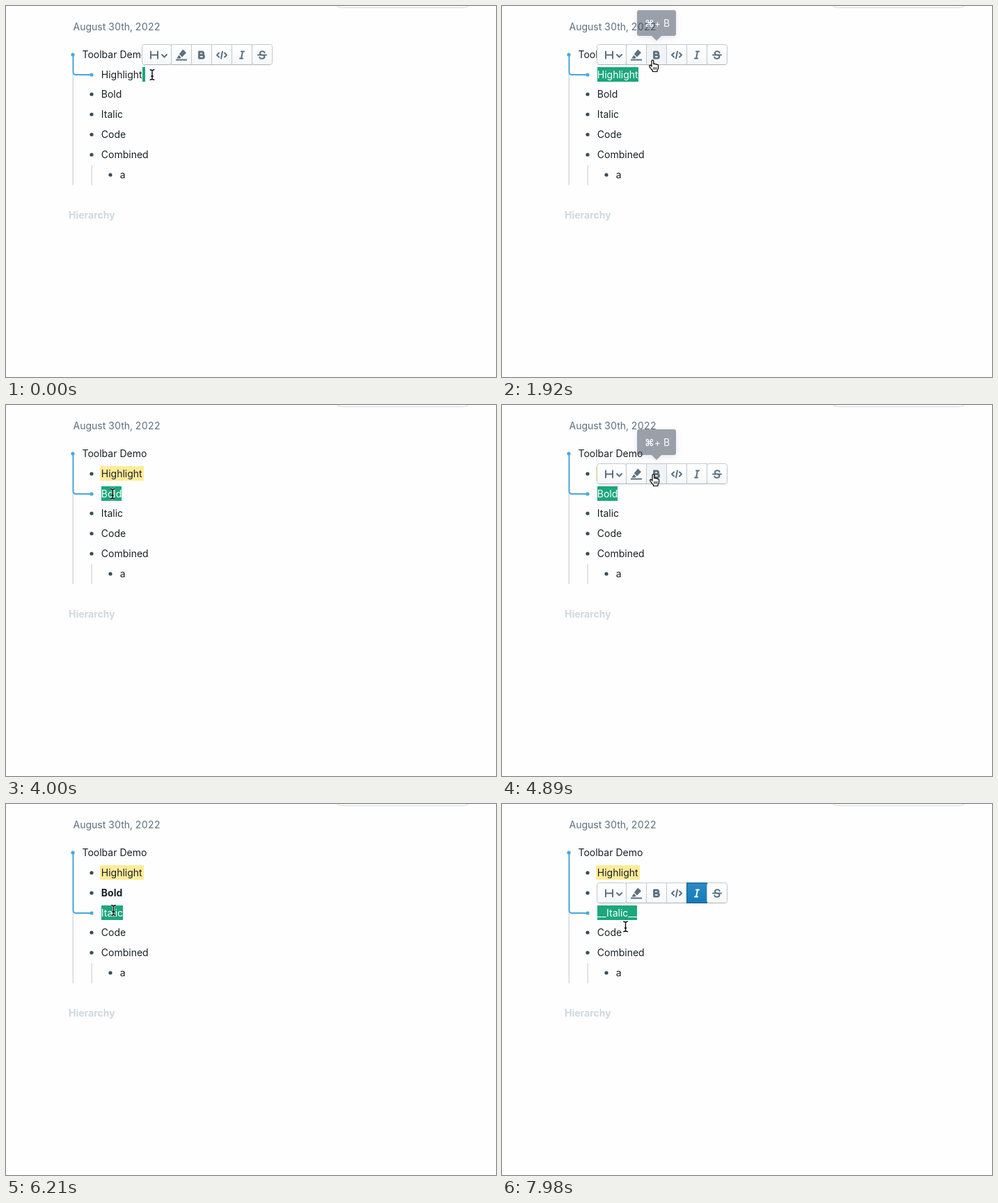
An HTML page that plays this animation: 704x534 px, repeating every 8 s.

```html
<!DOCTYPE html>
<html lang="en">
<head>
<meta charset="utf-8">
<title>Toolbar Demo</title>
<style>
html, body { margin: 0; width: 100%; height: 100%; overflow: hidden; background: #fefefe; }
body { position: relative; font: 14px/21px Inter, sans-serif; color: #182026; }
svg { position: absolute; left: 0; top: 0; }
p { position: absolute; margin: 0; white-space: pre; }
i, mark { display: inline-block; font-style: normal; color: inherit; }
i { background: #1ba77c; color: #fff; }
mark { background: #ffec99; padding: 0 2px; margin: 0 -2px; }
.date { color: #5c7080; font-variant-numeric: tabular-nums; }
.head { color: #ced9e0; font-weight: 700; }
</style>
</head>
<body>
<svg id="back" width="704" height="534"></svg>
<div id="text"></div>
<svg width="704" height="534">
  <defs>
    <linearGradient id="plain" x2="0" y2="1"><stop stop-color="#fff"/><stop offset="1" stop-color="#f5f8fa"/></linearGradient>
    <linearGradient id="on" x2="0" y2="1"><stop stop-color="#2b89c4"/><stop offset="1" stop-color="#137cbd"/></linearGradient>
    <linearGradient id="press" x2="0" y2="1"><stop stop-color="#2874a9"/><stop offset="1" stop-color="#10629a"/></linearGradient>
  </defs>
  <g id="front"></g>
</svg>
<script>
const LOOP = 8000, STEP = 147.9;
const $ = id => document.getElementById(id);

// edits in steps: word selected, then formatted with a toolbar button
const edits = [
  { word: 'Highlight', wrap: '^^', tag: 'mark', select: 4, format: 20, button: 1 },
  { word: 'Bold', wrap: '**', tag: 'b', select: 26, format: 36, button: 2 },
  { word: 'Italic', wrap: '__', select: 41, format: 51, button: 4 }
];
const words = ['Highlight', 'Bold', 'Italic', 'Code', 'Combined', 'a'];

// pointer moves: first step, last step, destination
const moves = [
  [0, 1, 210, 99], [1, 4, 184, 98], [7, 13, 216.5, 78], [14, 18, 189.5, 72], [21, 25, 153, 128],
  [28, 33, 217.5, 100], [36, 41, 154.5, 153], [43, 48, 272, 130], [51, 54, 177.5, 176.5]
];

const focusAt = k => Math.max(0, edits.findLastIndex(e => k >= e.select));

function pointerAt(k) {
  let [, , x, y] = moves[0];
  for (const [from, to, tx, ty] of moves) {
    const u = Math.min(1, Math.max(0, (k - from) / (to - from))), e = 1 - (1 - u) ** 2;
    x += (tx - x) * e;
    y += (ty - y) * e;
  }
  return { x, y };
}

function barAt(k) {
  if (k < 3) return { x: 195, y: 55 };
  const f = focusAt(k), next = edits[f + 1];
  const open = k >= edits[f].select + 2 && !(next && k >= next.select - 1);
  return open ? { x: 136, y: 55 + 29 * f } : null;
}

function hoverAt(k) {
  const bar = barAt(k), { x, y } = pointerAt(k);
  return bar && y > bar.y && y < bar.y + 30 ? Math.floor((x - bar.x - 42) / 29) + 1 : -1;
}

const line = (d, w = 2) => `<path d="${d}" fill="none" stroke="currentColor" stroke-width="${w}" stroke-linecap="round" stroke-linejoin="round"/>`;
const icons = [
  line('M3 3V13M13 3V13M3 8H13M19 7.5l3.5 3.5 3.5-3.5'),
  '<path fill="currentColor" d="M10.2 0L15 4.8 9 11 4.8 6.8zM4.3 8.2L7.7 11.6 6.3 13H1.3zM0 14H16V16H0z"/>',
  line('M4.5 3.5H8.4a2.2 2.2 0 0 1 0 4.5H4.5zM4.5 8H9.2a2.3 2.3 0 0 1 0 4.6H4.5z', 2.8),
  line('M4 5L1 8l3 3M12 5l3 3-3 3M9 3L7 13'),
  line('M7 3h4M5 13h4M9 3L7 13'),
  line('M2 8h12M11.6 4.6A3.4 2.6 0 1 0 8 8a3.6 2.6 0 1 1-3.7 3.2')
];

function drawPointer({ x, y }, hand) {
  if (hand) return `<g transform="translate(${x - 6} ${y - 1})" stroke="#000" stroke-linejoin="round">
    <path fill="#fff" stroke-width="1.2" d="M4.5 10V2.2a1.4 1.4 0 0 1 2.8 0V6.5q1.3-1 2.4.3 1.4-.7 2.3.6 1.9-.5 2 1.3v3.3q0 2-1.5 3.6V17.5H6V16Q3.6 13.5 1.7 10.8.6 8.6 1.9 8.2 3 8 4.5 10z"/>
    <path stroke-width=".9" d="M7.3 11v3.5M9.3 11v3.5M11.3 11v3.5"/></g>`;
  const d = 'M-3.3-7.2q3.3 0 3.3 2 0-2 3.3-2M0-5V5M-3.3 7.2q3.3 0 3.3-2 0 2 3.3 2M-1.7 2h3.4';
  return `<g transform="translate(${x} ${y})" fill="none"><path d="${d}" stroke="#fff" stroke-width="3" opacity=".8"/>
    <path d="${d}" stroke="#000" stroke-width="1.4"/></g>`;
}

function drawToolbar({ x, y }, active, hover) {
  const buttons = icons.map((icon, i) => {
    const bx = i ? 13 + 29 * i : 0, on = i === active, over = i === hover;
    const fill = on ? `url(#${over ? 'press' : 'on'})` : over ? '#f1f4f7' : 'none';
    return `<rect x="${bx + .5}" y=".5" width="${i ? 29 : 42}" height="29" rx="${i % 5 ? 0 : 3}" fill="${fill}" stroke="${on ? '#0f5d8e' : '#c3c9ce'}"/>
      <g transform="translate(${bx + (i ? 7 : 10)} 7.5)" color="${on ? '#fff' : '#5c7080'}">${icon}</g>`;
  });
  return `<g transform="translate(${x} ${y})">
    <rect x=".5" y=".5" width="187" height="29" rx="3" fill="url(#plain)"/>${buttons.join('')}
    <path d="M3 29.5H185" stroke="#10161a" opacity=".12"/></g>`;
}

function drawTip(x, y, key) {
  return `<g transform="translate(${x} ${y - 49})" opacity=".5" style="filter:drop-shadow(0 2px 4px rgba(16,22,26,.2))">
    <path fill="#394559" d="M-25 0H25q3 0 3 3V34q0 3-3 3H7L0 44-7 37H-25q-3 0-3-3V3q0-3 3-3z"/>
    <text x="-17" y="23.6" fill="#f5f8fa"><tspan font-weight="600">⌘</tspan>+ ${key}</text></g>`;
}

function rowText(word, i, k) {
  const e = edits[i], next = edits[i + 1];
  if (!i && k < 3) return word + '<i> </i>';
  if (!e || k < e.select) return word;
  if (next && k >= next.select) return `<${e.tag}>${word}</${e.tag}>`;
  return `<i>${k < e.format ? word : e.wrap + word + e.wrap}</i>`;
}

function draw(k) {
  const focus = focusAt(k), edit = edits[focus];
  const rows = words.map((word, i) => ({
    x: i === 5 ? 163.8 : 136.8,
    y: Math.floor(88 + 28.8 * i) + (i > 0 && i <= focus),
    html: rowText(word, i, k)
  }));
  const p = (x, y, s, c = '') => `<p class="${c}" style="left:${x}px;top:${y}px">${s}</p>`;
  $('text').innerHTML = p(96.5, 19, 'August 30th, 2022', 'date') + p(109.5, 59, 'Toolbar Demo') +
    rows.map(r => p(r.x, r.y, r.html)).join('') + p(90, 290, 'Hierarchy', 'head');

  const dot = (x, y, c) => `<circle cx="${x}" cy="${y}" r="2.6" fill="${c}"/>`;
  const blue = '#48a9dc', y = rows[focus].y + 11;
  $('back').innerHTML = `<rect x="468.5" y="-27.5" width="203" height="30" rx="15" fill="#fff" stroke="#d4d9dd"/>
    <path d="M96.25 70V258M123.25 229V258" stroke="#d5dbe0" stroke-width="1.5"/>
    <path d="M96.5 70V${y - 4}q0 4 4 4H123" fill="none" stroke="${blue}" stroke-width="2"/>` +
    dot(96, 70, blue) + rows.map((r, i) => dot(r.x - 13.8, r.y + 11, i === focus ? blue : '#394b59')).join('');

  const bar = barAt(k), hover = hoverAt(k), done = k >= edit.format;
  const key = { 1: 'H', 2: 'B' }[hover];
  let s = bar ? drawToolbar(bar, done ? edit.button : -1, hover) : '';
  if (key && !done && hoverAt(k - 1) === hover) s += drawTip(bar.x + 28 + 29 * hover, bar.y, key);
  $('front').innerHTML = s + drawPointer(pointerAt(k), hover >= 0);
}

let shown = -1;
function tick() {
  const k = Math.floor((performance.now() % LOOP + 12) / STEP);
  if (k !== shown) draw(shown = k);
  requestAnimationFrame(tick);
}
tick();
</script>
</body>
</html>
```
